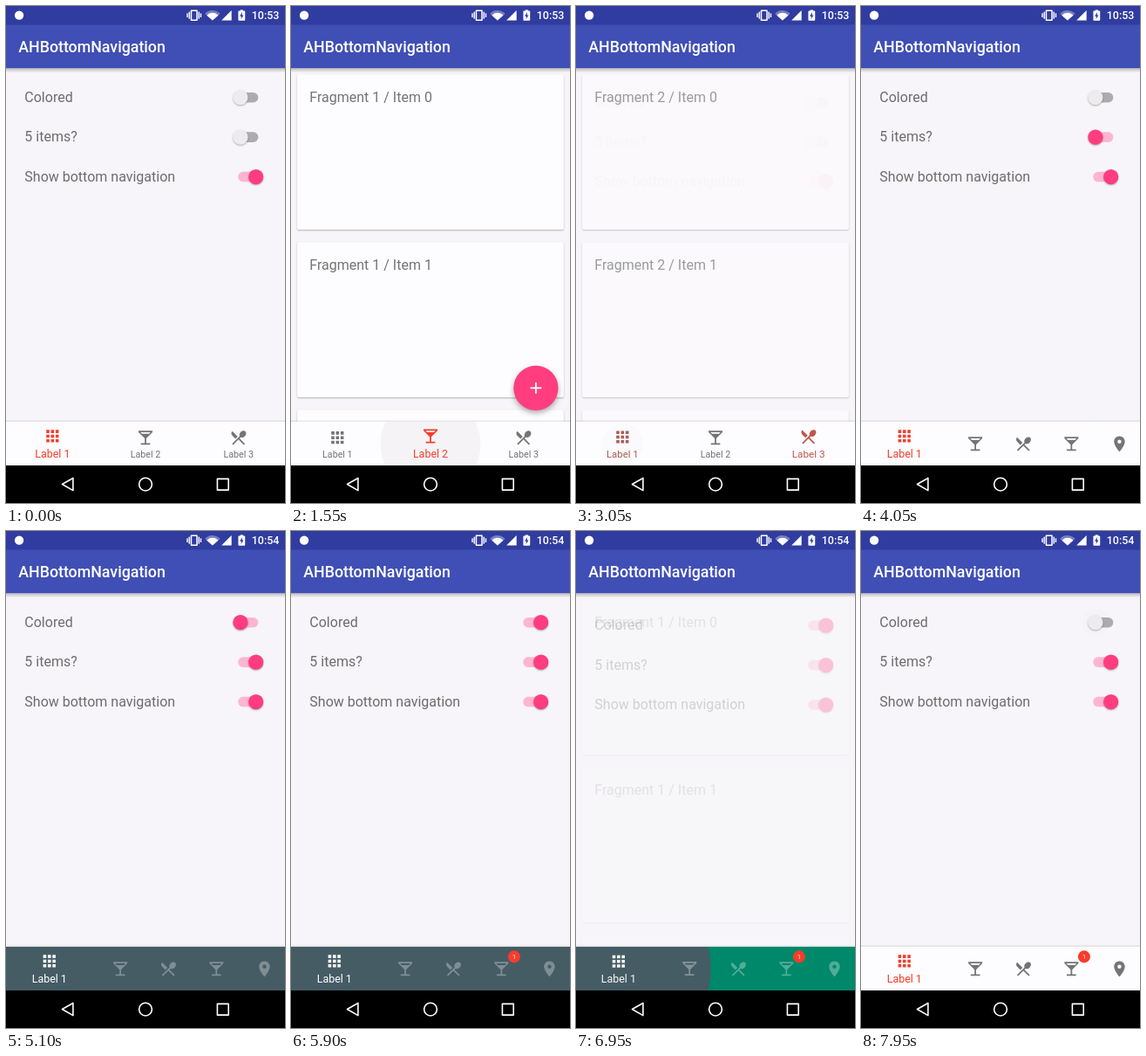
Animation, 320 px wide and 569 px high, one loop 8000 ms. Source, as an HTML page with a canvas:

```html
<!DOCTYPE html>
<html lang="en">
<head>
<meta charset="utf-8">
<title>Bottom navigation demo</title>
<style>
html, body { margin: 0; width: 100%; height: 100%; overflow: hidden; background: #000; }
canvas { display: block; width: 100vw; height: 100vh; }
</style>
</head>
<body>
<canvas id="stage"></canvas>
<script>
const LOOP = 8000;
const DP = 320 / 360; // layout is in dp on a 360 x 640 screen
const dpr = window.devicePixelRatio || 1;

function setUp(canvas) {
  canvas.width = 320 * dpr;
  canvas.height = 569 * dpr;
  const c = canvas.getContext('2d');
  c.setTransform(DP * dpr, 0, 0, DP * dpr, 0, 0);
  return c;
}
const screen2d = setUp(document.getElementById('stage'));
const layer2d = setUp(document.createElement('canvas'));
let ctx = screen2d;

const RED = [246, 61, 43], GREY = [116, 116, 116];
const PINK = '#ff3d7f', PAGE = '#f7f5f9', STATUS = '#303c9f', TOOLBAR = '#3f4fb5';
const TAB_COLORS = ['#455c65', '#00886a', '#8b6b62'];
const BAR = 535.5, NAV = 591.75;

// When each tab is tapped, and when each switch is flipped
const TAPS = [[-9999, 0], [1292, 1], [2180, 2], [2985, 0], [5950, 1], [6819, 0]];
const COLORED = [[-9999, false], [5095, true], [7520, false]];
const FIVE = [[-9999, false], [4045, true]];
const SHOWN = [[-9999, true]];
const CLOCK_TICK = 4300;

const ICONS = {
  apps: new Path2D('M4 4h4v4H4zM10 4h4v4h-4zM16 4h4v4h-4zM4 10h4v4H4zM10 10h4v4h-4zM16 10h4v4h-4zM4 16h4v4H4zM10 16h4v4h-4zM16 16h4v4h-4z'),
  bar: new Path2D('M11 13v6H6v2h12v-2h-5v-6l8-8V3H3v2l8 8zM7.5 7l-2-2h13l-2 2h-9z'),
  food: new Path2D('M8.1 13.34l2.83-2.83L3.91 3.5c-1.56 1.56-1.56 4.09 0 5.66l4.19 4.18zm6.78-1.81c1.53.71 3.68.21 5.27-1.38 1.91-1.91 2.28-4.65.81-6.12-1.46-1.46-4.2-1.1-6.12.81-1.59 1.59-2.09 3.74-1.38 5.27L3.7 19.87l1.41 1.41L12 14.41l6.88 6.88 1.41-1.41L13.41 13l1.47-1.47z'),
  place: new Path2D('M12 2C8.13 2 5 5.13 5 9c0 5.25 7 13 7 13s7-7.75 7-13c0-3.87-3.13-7-7-7zm0 9.5a2.5 2.5 0 1 1 0-5 2.5 2.5 0 0 1 0 5z')
};
const ITEMS = ['apps', 'bar', 'food', 'bar', 'place'];

const clamp = x => Math.min(1, Math.max(0, x));
const ease = x => (1 - Math.cos(Math.PI * clamp(x))) / 2;
const easeOut = x => 1 - (1 - clamp(x)) ** 2;
const lerp = (a, b, p) => a + (b - a) * p;
const blend = (a, b, p) => `rgb(${a.map((v, i) => Math.round(lerp(v, b[i], p)))})`;
const overshoot = x => {
  const s = clamp(x) - 1;
  return s * s * (3 * s + 2) + 1;
};

function lastEvent(list, t) {
  let i = list.length - 1;
  while (list[i][0] > t) i--;
  return { value: list[i][1], prev: list[Math.max(0, i - 1)][1], age: t - list[i][0] };
}

function rect(x, y, w, h, fill) {
  ctx.fillStyle = fill;
  ctx.fillRect(x, y, w, h);
}

function disc(x, y, r, fill) {
  ctx.fillStyle = fill;
  ctx.beginPath();
  ctx.arc(x, y, Math.max(0, r), 0, 2 * Math.PI);
  ctx.fill();
}

function roundRect(x, y, w, h, r, fill) {
  ctx.fillStyle = fill;
  ctx.beginPath();
  ctx.roundRect(x, y, w, h, r);
  ctx.fill();
}

function poly(points, fill) {
  ctx.beginPath();
  points.forEach(([x, y]) => ctx.lineTo(x, y));
  ctx.closePath();
  if (fill) {
    ctx.fillStyle = fill;
    ctx.fill();
  } else ctx.stroke();
}

function text(str, x, y, size, fill, align = 'left', weight = 400) {
  ctx.font = `${weight} ${size}px Roboto, sans-serif`;
  ctx.textAlign = align;
  ctx.fillStyle = fill;
  ctx.fillText(str, x, y);
}

function fade(y, h, from, to) {
  const g = ctx.createLinearGradient(0, y, 0, y + h);
  g.addColorStop(0, `rgba(0,0,0,${from})`);
  g.addColorStop(1, `rgba(0,0,0,${to})`);
  rect(0, y, 360, h, g);
}

function withShadow(blur, dy, alpha, draw) {
  ctx.save();
  ctx.shadowColor = `rgba(0,0,0,${alpha})`;
  ctx.shadowBlur = blur * dpr;
  ctx.shadowOffsetY = dy * dpr;
  draw();
  ctx.restore();
}

// Draws a group opaque on the spare layer, then lays it on the screen as a whole
function withAlpha(alpha, draw) {
  if (alpha <= 0) return;
  ctx = layer2d;
  ctx.clearRect(0, 0, 360, 641);
  draw();
  ctx = screen2d;
  ctx.save();
  ctx.setTransform(1, 0, 0, 1, 0, 0);
  ctx.globalAlpha = clamp(alpha);
  ctx.drawImage(layer2d.canvas, 0, 0);
  ctx.restore();
}

function drawSwitch(y, { value: on, age }) {
  const p = on ? ease(age / 250) : 1 - ease(age / 250);
  const x = lerp(302.5, 322.5, p);
  roundRect(299.5, y - 6.5, 26, 13, 6.5, on ? '#ffb5cf' : '#adabae');
  const glow = 0.03 * clamp(age / 100) * clamp((500 - age) / 250);
  if (glow > 0) disc(x, y, 18, `rgba(0,0,0,${glow})`);
  withShadow(2, 1, 0.3, () => disc(x, y, 9.7, on ? PINK : '#ecebed'));
}

function drawSettings(t) {
  const rows = [['Colored', COLORED], ['5 items?', FIVE], ['Show bottom navigation', SHOWN]];
  rows.forEach(([label, events], i) => {
    const y = 117.2 + 51.1 * i;
    text(label, 24, y + 6.4, 18, 'rgba(0,0,0,.56)');
    drawSwitch(y + 0.6, lastEvent(events, t));
  });
}

function drawCards(n) {
  for (let i = 0; i < 3; i++) {
    const y = 88 + 216 * i;
    withShadow(2, 1, 0.28, () => roundRect(8, y, 344, 200, 2, '#fdfcfe'));
    text(`Fragment ${n} / Item ${i}`, 24, y + 35.6, 18, 'rgba(0,0,0,.54)');
  }
}

function drawPage(tab, t, alpha, dy) {
  withAlpha(alpha, () => {
    ctx.save();
    ctx.translate(0, dy);
    tab ? drawCards(tab) : drawSettings(t);
    ctx.restore();
  });
}

function drawContent(t, tap) {
  rect(0, 80, 360, BAR - 80, PAGE);
  const shown = clamp((tap.age - 45) / 205);
  if (tap.prev !== tap.value) drawPage(tap.prev, t, 1 - clamp((tap.age - 30) / 120), 0);
  drawPage(tap.value, t, shown ** 1.5, 6.75 * (1 - shown));
}

function drawFab(tap) {
  let scale = 0;
  if (tap.value === 1) scale = overshoot(tap.age / 300);
  else if (tap.prev === 1) scale = 1 - easeOut(tap.age / 150);
  withAlpha(scale, () => {
    ctx.save();
    ctx.translate(316, 492);
    ctx.scale(scale, scale);
    withShadow(6, 3, 0.32, () => disc(0, 0, 28, PINK));
    rect(-7, -1, 14, 2, '#fff');
    rect(-1, -7, 2, 14, '#fff');
    ctx.restore();
  });
}

function drawIcon(name, x, y) {
  ctx.save();
  ctx.translate(x - 12, y - 12);
  ctx.fill(ICONS[name], 'evenodd');
  ctx.restore();
}

function drawBar(t, tap) {
  const five = lastEvent(FIVE, t), colored = lastEvent(COLORED, t);
  const p = ease(tap.age / 150);
  const weight = i => i === tap.value ? p : i === tap.prev ? 1 - p : 0;
  const count = five.value ? 5 : 3;
  const centers = [];
  let left = five.value ? -4.5 : 0;
  for (let i = 0; i < count; i++) {
    const w = five.value ? lerp(62, 121, weight(i)) : 120;
    centers.push(left + w / 2);
    left += w;
  }

  fade(BAR - 3, 3, 0, 0.1);
  ctx.save();
  ctx.beginPath();
  ctx.rect(0, BAR, 360, NAV - BAR);
  ctx.clip();
  const cx = centers[tap.value];
  if (colored.value) {
    rect(0, BAR, 360, 57, TAB_COLORS[tap.prev]);
    if (tap.age > 315) rect(0, BAR, 360, 57, TAB_COLORS[tap.value]);
    else disc(cx, BAR + 28, ease((tap.age - 15) / 300) * 360, TAB_COLORS[tap.value]);
  } else {
    rect(0, BAR, 360, 57, '#fdfcfe');
    const alpha = 0.034 * clamp(tap.age / 200) * clamp((700 - tap.age) / 400);
    if (alpha > 0) disc(cx, BAR + 29, 65 * easeOut(tap.age / 280), `rgba(60,0,60,${alpha})`);
  }

  centers.forEach((x, i) => {
    const w = weight(i);
    const tint = colored.value ? `rgba(255,255,255,${lerp(0.31, 1, w)})` : blend(GREY, RED, w);
    ctx.fillStyle = tint;
    drawIcon(ITEMS[i], x, BAR + lerp(five.value ? 28.5 : 20.5, 18.5, w));
    if (five.value && w === 0) return;
    ctx.globalAlpha = five.value ? w : 1;
    text(`Label ${i + 1}`, x, 581.3, five.value ? 14 : lerp(12, 14, w), tint, 'center');
    ctx.globalAlpha = 1;
  });

  if (five.value) {
    const pop = overshoot((Math.min(five.age, colored.age) - 100) / 250);
    if (pop > 0) {
      ctx.translate(centers[3] + 16.4, 548.3);
      ctx.scale(pop, pop);
      disc(0, 0, 7.9, `rgb(${RED})`);
      text('1', 0, 3.1, 9, '#ffe3e0', 'center');
    }
  }
  ctx.restore();
}

function drawStatus(t) {
  rect(0, 0, 360, 24, STATUS);
  disc(17, 12, 5.8, '#fff');

  // vibrate
  ctx.strokeStyle = '#fff';
  ctx.lineWidth = 1.7;
  ctx.strokeRect(239, 5.8, 7.4, 12.4);
  for (const [dx, h] of [[6.2, 4.5], [8.7, 2.6]]) {
    rect(242.7 - dx - 0.8, 12 - h, 1.6, 2 * h, '#fff');
    rect(242.7 + dx - 0.8, 12 - h, 1.6, 2 * h, '#fff');
  }

  // wifi
  const fan = (r, fill) => {
    ctx.fillStyle = fill;
    ctx.beginPath();
    ctx.moveTo(266.5, 18.6);
    ctx.arc(266.5, 18.6, r, -Math.PI * 0.77, -Math.PI * 0.23);
    ctx.fill();
  };
  fan(13, 'rgba(255,255,255,.35)');
  fan(9.8, '#fff');

  poly([[291, 5.5], [291, 18.6], [278, 18.6]], '#fff');

  // battery
  rect(302.3, 5, 3.6, 2, '#fff');
  roundRect(299.7, 6.2, 8.8, 12.6, 1, '#fff');
  poly([[304.8, 8], [301.6, 13.2], [303.6, 13.2], [303.3, 17], [306.6, 11.7], [304.6, 11.7]], STATUS);

  text(t < CLOCK_TICK ? '10:53' : '10:54', 352.5, 17, 14, '#fff', 'right', 500);
}

function drawToolbar() {
  rect(0, 24, 360, 56, TOOLBAR);
  fade(80, 6, 0.24, 0);
  text('AHBottomNavigation', 16, 59.9, 20, '#fff', 'left', 500);
}

function drawNavKeys() {
  rect(0, NAV, 360, 50, '#000');
  ctx.strokeStyle = '#fff';
  ctx.lineWidth = 1.8;
  ctx.lineJoin = 'round';
  poly([[72.5, 616], [86.5, 608], [86.5, 624]]);
  ctx.beginPath();
  ctx.arc(180, 616, 8.3, 0, 2 * Math.PI);
  ctx.stroke();
  ctx.strokeRect(272.7, 609, 14.4, 14.4);
}

function draw(t) {
  const tap = lastEvent(TAPS, t);
  drawContent(t, tap);
  drawFab(tap);
  drawBar(t, tap);
  drawToolbar();
  drawStatus(t);
  drawNavKeys();
}

const start = performance.now();
function frame() {
  draw((performance.now() - start) % LOOP);
  requestAnimationFrame(frame);
}
frame();
</script>
</body>
</html>
```
